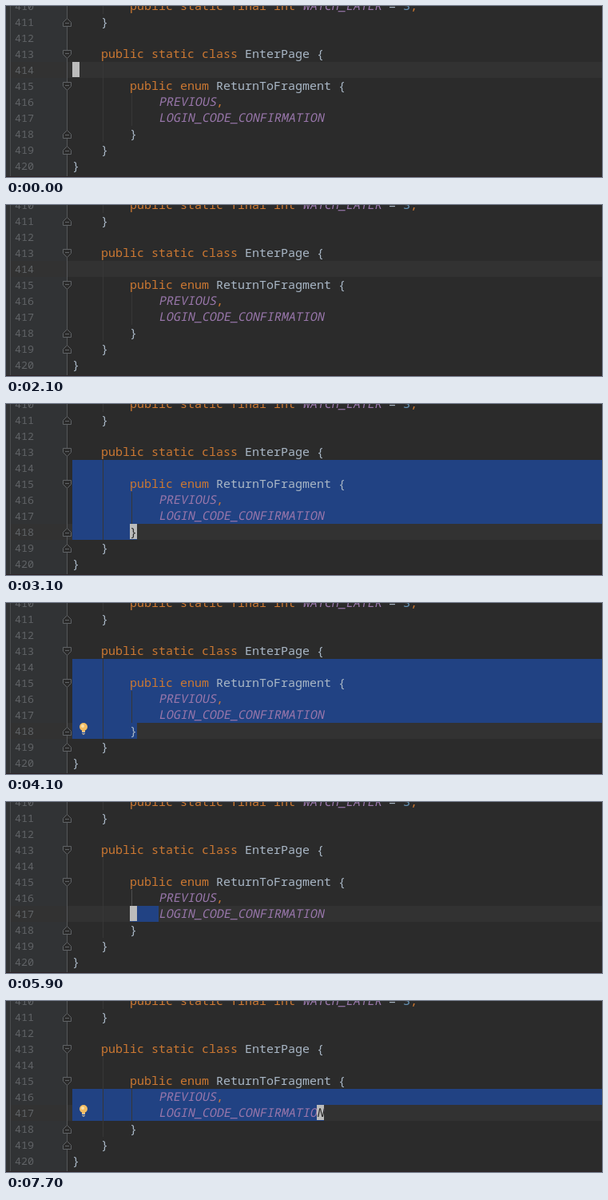
These frames come from a looping animation (746 px wide and 214 px high, 8.1 s). An HTML page with a canvas:

```html
<!DOCTYPE html>
<html lang="en">
<head>
<meta charset="utf-8">
<title>Editor selection</title>
<style>
  html, body { margin: 0; width: 100%; height: 100%; overflow: hidden; background: #2b2b2b; }
  canvas { display: block; }
</style>
</head>
<body>
<canvas id="stage" width="746" height="214"></canvas>
<script>
const ctx = document.getElementById('stage').getContext('2d');
const WIDTH = 746, HEIGHT = 214, LOOP = 8100;
const FIRST_LINE = 410, ROW = 20, CELL = 9, LEFT = 83;
const CAP_HEIGHT = 10, SLANT = 0.2;

// Of the fonts sized to fill one cell, take the one with the nearest capital height.
const FONT = ['Noto Sans Mono CJK JP', 'Noto Sans Mono'].map(name => {
  const family = `"${name}", "Noto Sans Mono", monospace`;
  ctx.font = `100px ${family}`;
  const { width, actualBoundingBoxAscent } = ctx.measureText('E');
  const size = CELL * 100 / width;
  return { family, size, error: Math.abs(actualBoundingBoxAscent * size / 100 - CAP_HEIGHT) };
}).sort((a, b) => a.error - b.error)[0];

const STYLES = {
  keyword: { color: '#cc7832' },
  plain: { color: '#a9b7c6' },
  constant: { color: '#9876aa', slanted: true },
  number: { color: '#6897bb' },
  match: { color: '#ffef28', weight: 'bold' }
};

// [line, column, text, style]
const CODE = [
  [410, 8, 'public static final int', 'keyword'],
  [410, 32, 'WATCH_LATER', 'constant'],
  [410, 44, '=', 'plain'],
  [410, 46, '3', 'number'],
  [410, 47, ';', 'keyword'],
  [411, 4, '}', 'plain'],
  [413, 4, 'public static class', 'keyword'],
  [413, 24, 'EnterPage {', 'plain'],
  [415, 8, 'public enum', 'keyword'],
  [415, 20, 'ReturnToFragment', 'plain'],
  [415, 37, '{', 'plain'],
  [416, 12, 'PREVIOUS', 'constant'],
  [416, 20, ',', 'keyword'],
  [417, 12, 'LOGIN_CODE_CONFIRMATION', 'constant'],
  [418, 8, '}', 'plain'],
  [419, 4, '}', 'plain'],
  [420, 0, '}', 'plain']
];

// Selections: [first line, first column, last line, column after the end]
const TAB = [414, 0, 414, 4];
const BLOCK = [414, 0, 418, 9];
const INNER_TAB = [417, 8, 417, 12];
const BODY = [416, 0, 417, 35];

const STATES = [
  { at: 0, line: 414, col: 0, caret: true },
  { at: 200, line: 414, col: 0 },
  { at: 400, line: 415, col: 0, caret: true },
  { at: 700, line: 416, col: 0, caret: true },
  { at: 1100, line: 415, col: 0, caret: true },
  { at: 1300, line: 414, col: 0, caret: true },
  { at: 2100, line: 414, col: 0 },
  { at: 2200, line: 414, col: 0, selection: TAB },
  { at: 2300, line: 414, col: 0, caret: true, selection: TAB },
  { at: 2800, line: 414, col: 0, caret: true, selection: TAB, bulbY: 55 },
  { at: 3100, line: 418, col: 8, caret: true, selection: BLOCK },
  { at: 3800, line: 418, col: 8, caret: true, selection: BLOCK, bulbY: 150 },
  { at: 4100, line: 418, col: 8, selection: BLOCK, bulbY: 150 },
  { at: 4600, line: 418, col: 8, caret: true, braces: true },
  { at: 4800, line: 418, col: 8, caret: true, braces: true, scope: true },
  { at: 5000, line: 417, col: 8, caret: true, guide: true },
  { at: 5700, line: 417, col: 8, selection: INNER_TAB, guide: true },
  { at: 5900, line: 417, col: 8, caret: true, selection: INNER_TAB, guide: true },
  { at: 6400, line: 417, col: 34, caret: true, selection: BODY },
  { at: 7100, line: 417, col: 34, selection: BODY, bulbY: 130 },
  { at: 7700, line: 417, col: 34, caret: true, selection: BODY, bulbY: 130 }
];

const rowY = line => (line - FIRST_LINE) * ROW - 10;
const colX = col => LEFT + col * CELL;

function rect(x, y, w, h, color) {
  ctx.fillStyle = color;
  ctx.fillRect(x, y, w, h);
}

function write(line, col, text, { color, weight = 'normal', slanted }) {
  ctx.save();
  ctx.translate(colX(col), rowY(line) + 15);
  if (slanted) ctx.transform(1, 0, -SLANT, 1, 0, 0);
  ctx.font = `${weight} ${FONT.size}px ${FONT.family}`;
  ctx.fillStyle = color;
  ctx.fillText(text, 0, 0);
  ctx.restore();
}

function drawGutter(caretLine, scope) {
  rect(0, 0, 76, HEIGHT, '#313335');
  rect(6, rowY(caretLine), 70, ROW, '#323232');
  rect(5, 0, 1, HEIGHT, '#4b4d4f');
  rect(76, 0, 1, HEIGHT, '#555759');
  ctx.font = `${FONT.size * 8 / CELL}px ${FONT.family}`;
  ctx.fillStyle = '#606366';
  for (let line = FIRST_LINE; line <= 420; line++) ctx.fillText(line, 11, rowY(line) + 15);
  if (scope) rect(66, 90, 1, 80, '#587973');
  for (const line of [413, 415]) drawFold(line, 1);
  for (const line of [411, 418, 419]) drawFold(line, -1);
}

// direction 1 points down (block start), -1 points up (block end)
function drawFold(line, direction) {
  ctx.save();
  ctx.translate(76.5, rowY(line) + 10.5);
  ctx.scale(1, direction);
  ctx.beginPath();
  ctx.moveTo(-5, -5);
  ctx.lineTo(5, -5);
  ctx.lineTo(5, 0);
  ctx.lineTo(0, 5);
  ctx.lineTo(-5, 0);
  ctx.closePath();
  ctx.fillStyle = '#2b2b2b';
  ctx.fill();
  ctx.moveTo(-2.5, -1);
  ctx.lineTo(2.5, -1);
  ctx.strokeStyle = '#606366';
  ctx.stroke();
  ctx.restore();
}

function drawSelection([first, start, last, end]) {
  for (let line = first; line <= last; line++) {
    const x = line === first ? colX(start) : LEFT;
    const right = line === last ? colX(end) : WIDTH;
    rect(x, rowY(line), right - x, ROW, '#214283');
  }
}

function drawGuides(active) {
  rect(121, 0, 1, 10, '#373737');
  rect(121, 70, 1, 100, '#373737');
  rect(157, 110, 1, 40, active ? '#505050' : '#373737');
}

function drawCaret({ line, col, braces }) {
  rect(colX(col), rowY(line), CELL, 19, '#bbbbbb');
  const run = CODE.find(([l, c, text]) => l === line && col >= c && col < c + text.length);
  if (!run) return;
  const { slanted } = STYLES[run[3]];
  const weight = braces ? 'bold' : 'normal';
  write(line, col, run[2][col - run[1]], { color: '#2b2b2b', weight, slanted });
}

function drawBulb(y) {
  ctx.fillStyle = '#f3bd63';
  ctx.beginPath();
  ctx.arc(97, y + 5, 5, 0, Math.PI * 2);
  ctx.fill();
  rect(95, y + 8, 4, 3, '#f3bd63');
  ctx.fillStyle = '#fbe0a8';
  ctx.beginPath();
  ctx.arc(96, y + 4, 2, 0, Math.PI * 2);
  ctx.fill();
  rect(95, y + 11, 4, 1, '#c4c4c4');
  rect(95, y + 13, 4, 1, '#a8a8a8');
  rect(96, y + 14, 2, 1, '#8c8c8c');
}

function draw(now) {
  const time = now % LOOP;
  const state = STATES.findLast(s => s.at <= time);
  rect(0, 0, WIDTH, HEIGHT, '#2b2b2b');
  rect(77, rowY(state.line), WIDTH - 77, ROW, '#323232');
  if (state.selection) drawSelection(state.selection);
  drawGuides(state.guide);
  drawGutter(state.line, state.scope);
  if (state.braces) rect(colX(37), rowY(415), CELL, ROW, '#3b514d');
  for (const [line, col, text, style] of CODE) {
    const matched = state.braces && line === 415 && col === 37;
    write(line, col, text, STYLES[matched ? 'match' : style]);
  }
  if (state.caret) drawCaret(state);
  if (state.bulbY) drawBulb(state.bulbY);
  rect(0, 213, WIDTH, 1, '#2d2326');
}

let start;
function tick(now) {
  start ??= now;
  draw(now - start);
  requestAnimationFrame(tick);
}
draw(0);
requestAnimationFrame(tick);
</script>
</body>
</html>
```
